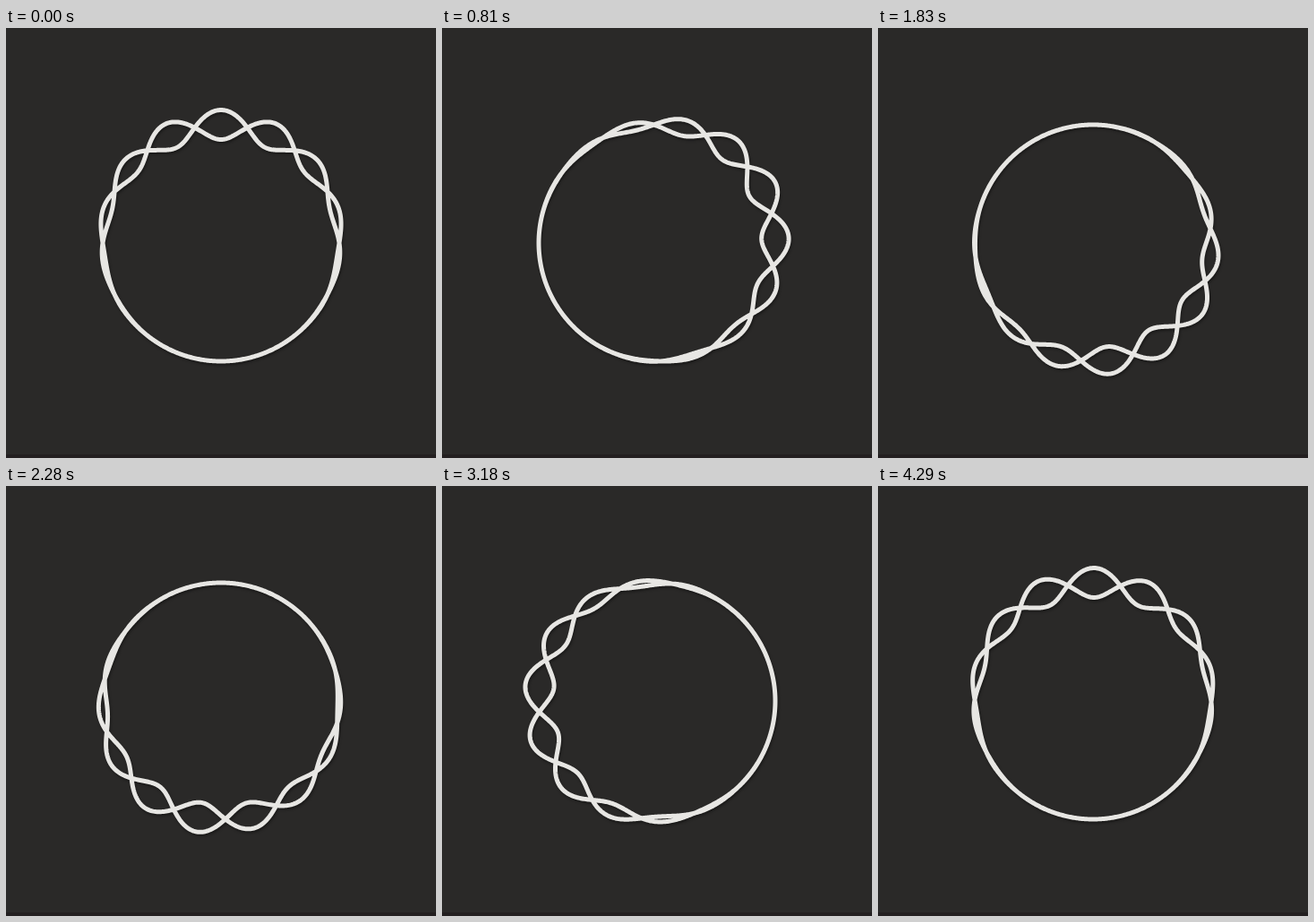
An HTML page with a canvas for the animation above (4320 ms loop, 480 by 480 pixels).

```html
<!DOCTYPE html>
<html lang="en">
<head>
<meta charset="utf-8">
<title>Braided ring</title>
<style>
  html, body { margin: 0; width: 100%; height: 100%; overflow: hidden; background: #2a2928; }
  canvas { display: block; width: 480px; height: 480px; }
</style>
</head>
<body>
<canvas id="stage" width="480" height="480"></canvas>
<script>
const ctx = document.getElementById("stage").getContext("2d");
const LOOP = 4320, STEP = 30;
const SIZE = 480, CENTER = SIZE / 2;
const RADIUS = 132, SWING = 16.5, WAVES = 7, POINTS = 720;
const TAU = 2 * Math.PI;

// One strand: a cosine on the circle, swelling around the angle `peak`.
function addStrand(sign, peak, phase) {
  for (let i = 0; i < POINTS; i++) {
    const a = TAU * i / POINTS;
    const swell = Math.pow((1 + Math.cos(a - peak)) / 2, 2.5);
    const r = RADIUS + sign * SWING * swell * Math.cos(WAVES * a + phase);
    const x = CENTER + r * Math.sin(a);
    const y = CENTER - r * Math.cos(a);
    if (i) ctx.lineTo(x, y); else ctx.moveTo(x, y);
  }
  ctx.closePath();
}

function draw(t) {
  ctx.shadowColor = "transparent";
  ctx.fillStyle = "#2a2928";
  ctx.fillRect(0, 0, SIZE, SIZE);
  ctx.fillStyle = "#231f20";
  ctx.fillRect(0, SIZE - 4, SIZE, 4);

  ctx.beginPath();
  for (const sign of [1, -1]) addStrand(sign, TAU * t, 3 * Math.PI * t);
  ctx.shadowColor = "rgba(0, 0, 0, 0.4)";
  ctx.shadowOffsetX = 1;
  ctx.shadowOffsetY = 2;
  ctx.shadowBlur = 3;
  ctx.lineWidth = 5;
  ctx.lineJoin = "round";
  ctx.strokeStyle = "#e7e6e3";
  ctx.stroke();
}

const start = performance.now();
function tick() {
  const ms = (performance.now() - start) % LOOP;
  draw(Math.floor(ms / STEP) * STEP / LOOP);
  requestAnimationFrame(tick);
}
tick();
</script>
</body>
</html>
```
